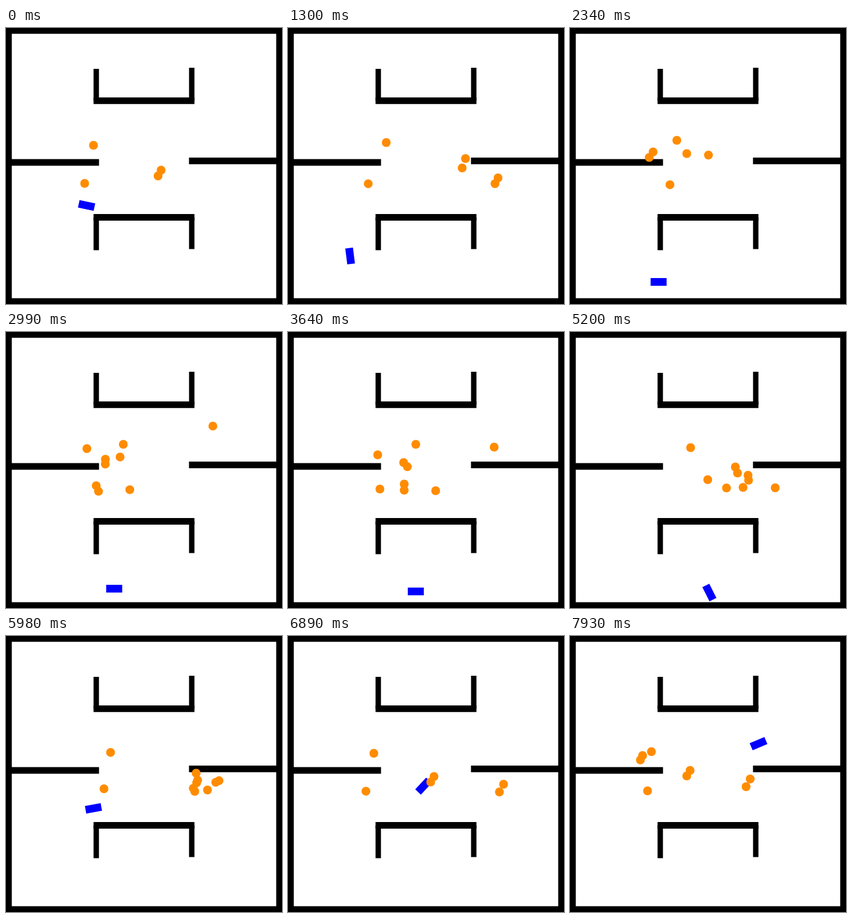
Write an HTML page with a canvas that moves like this. It is 500 px wide and 500 px high and loops after 8000 ms.

```html
<!DOCTYPE html>
<html lang="en">
<head>
<meta charset="utf-8">
<title>Robot and walkers</title>
<style>
  html, body { margin: 0; width: 100%; height: 100%; overflow: hidden; background: #fff; }
  canvas { display: block; width: 500px; height: 500px; }
</style>
</head>
<body>
<canvas id="stage" width="500" height="500"></canvas>
<script>
const ctx = document.getElementById('stage').getContext('2d');
const STEP = 130, LOOP = 8000, LAST = 61, RESTART = 45;

// Walkers exist only while inside this area.
const area = { left: 126, right: 395, top: 145, bottom: 295 };

// Each walker follows straight legs through [step, x, y] points and
// carries on beyond both ends until it leaves the area.
const walkers = [];
const walk = (...points) => walkers.push(points);
const walkPair = (dx, dy, ...points) => {
  walk(...points);
  walk(...points.map(([n, x, y]) => [n, x + dx, y + dy]));
};

// strollers that wait or turn
walk([0, 158, 212], [18, 193, 203], [28, 231, 203], [40, 218, 209], [53, 155, 212], [61, 147, 209]);
walk([0, 142, 281], [14, 146, 282], [28, 267, 287], [44, 406, 280]);
walk([20, 375, 147], [28, 373, 208], [40, 322, 259], [47, 396, 262]);
walk([29, 390, 250], [40, 249, 267], [49, 141, 281], [61, 140, 280]);
// heading right
walkPair(-5.5, 10.5, [0, 280.5, 257], [10, 380, 271]);
walk([18, 150, 224], [28, 209, 236], [40, 299, 244]);
walk([18, 143, 234], [40, 303, 255]);
walk([28, 210, 275], [40, 323, 268]);
walk([28, 210, 286], [40, 313, 281]);
walk([28, 166, 284], [40, 283, 282]);
walkPair(-4, 8, [58, 125, 212], [61, 131, 216]);
// heading left
walk([10, 321, 236], [28, 162, 222]);
walk([10, 315, 253], [18, 211, 227]);
walkPair(-6, 10, [42, 391, 272], [53, 264, 254], [61, 217, 243]);
walkPair(-7.5, 14, [53, 390, 268], [61, 326, 258.5]);

// Robot points are [step, x, y, heading]; the second run is a fresh start.
const firstRun = [
  [0, 146, 321.5, 192], [7, 113, 376, 90], [10, 112.5, 413, 83], [14, 128, 451, 45],
  [18, 160.5, 460, 0], [28, 231.5, 470, 0], [40, 252.5, 472, -116.5]
];
const secondRun = [[RESTART, 146, 318, -5], [53, 245.5, 272, -47], [61, 341.5, 195, -23]];

function poseAt(points, n) {
  let i = points.findIndex(p => p[0] >= n);
  if (i < 0) i = points.length - 1;
  i = Math.max(1, i);
  const [a, b] = [points[i - 1], points[i]];
  const f = (n - a[0]) / (b[0] - a[0]);
  return a.slice(1).map((v, j) => v + (b[j + 1] - v) * f);
}

const inArea = ([x, y]) =>
  x >= area.left && x <= area.right && y >= area.top && y <= area.bottom;

function line(width, ...points) {
  ctx.lineWidth = width;
  ctx.beginPath();
  points.forEach(([x, y]) => ctx.lineTo(x, y));
  ctx.stroke();
}

function drawWalls() {
  ctx.strokeStyle = '#000';
  ctx.lineWidth = 10.5;
  ctx.strokeRect(5.25, 5.25, 489.5, 489.5);
  line(12, [0, 243.5], [168.5, 243.5]);
  line(12, [331.5, 240.7], [500, 240.7]);
  // two brackets, one opening up and one opening down
  for (const [y, leftEnd, rightEnd] of [[131.8, 74, 72], [343, 402.5, 400.5]]) {
    line(12, [158.6, y], [341.4, y]);
    line(9.8, [163.5, y], [163.5, leftEnd]);
    line(9.8, [336.5, y], [336.5, rightEnd]);
  }
}

function drawRobot([x, y, deg]) {
  ctx.save();
  ctx.translate(x, y);
  ctx.rotate(deg * Math.PI / 180);
  ctx.fillStyle = '#00f';
  ctx.fillRect(-14.5, -7, 29, 14);
  ctx.restore();
}

function drawWalker([x, y]) {
  ctx.fillStyle = '#ff8c00';
  ctx.beginPath();
  ctx.arc(x + 0.5, y + 0.5, 8, 0, Math.PI * 2);
  ctx.fill();
}

function draw(n) {
  ctx.fillStyle = '#fff';
  ctx.fillRect(0, 0, 500, 500);
  drawWalls();
  drawRobot(poseAt(n < RESTART ? firstRun : secondRun, n));
  walkers.map(points => poseAt(points, n)).filter(inArea).forEach(drawWalker);
}

const start = performance.now();
function tick() {
  const t = (performance.now() - start) % LOOP;
  draw(Math.min(LAST, Math.floor(t / STEP)));
  requestAnimationFrame(tick);
}
tick();
</script>
</body>
</html>
```
